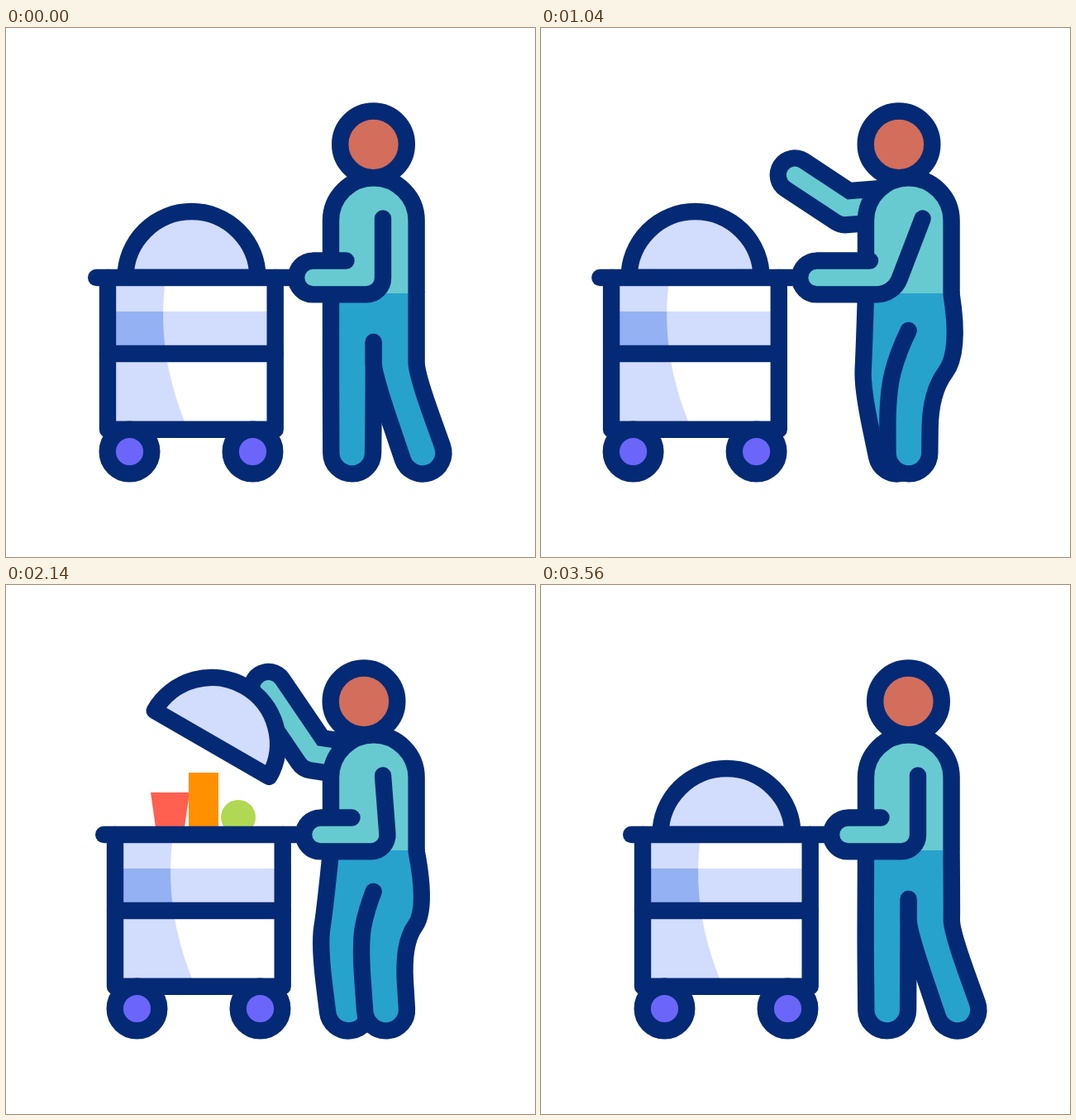
Recreate the animation shown at these times as an HTML page with a canvas. Size 640 px wide and 640 px high, loop 3.6 s.

```html
<!DOCTYPE html>
<html lang="en">
<head>
<meta charset="utf-8">
<title>Serving trolley</title>
<style>
html, body { margin: 0; width: 100%; height: 100%; overflow: hidden; background: #fff; }
canvas { display: block; width: 640px; height: 640px; }
</style>
</head>
<body>
<canvas id="stage" width="640" height="640"></canvas>
<script>
const LOOP = 3600;
const NAVY = '#042a75', TEAL = '#67cad0', BLUE = '#27a2cd', SKIN = '#d36d5c';
const LILAC = '#d2dcfd', SHADE = '#94b1f3', WHEEL = '#6b65fa';
const HIP_Y = 322, CROTCH_X = 444.7, FAR_HIP = 393, NEAR_HIP = 496.6;
const LEG_WIDTH = NEAR_HIP - CROTCH_X;
const FAR_FOOT = 418.7, NEAR_FOOT = 504;
const ctx = document.getElementById('stage').getContext('2d');

const mix = (a, b, k) => a + (b - a) * k;

function ease(from, to, t) {
  const p = Math.min(1, Math.max(0, (t - from) / (to - from)));
  return p * p * (3 - 2 * p);
}

// A pose that eases through successive moves [from, to, ...values] and rests between them.
const motion = (pose, ...moves) => t => moves.reduce(
  (now, [from, to, ...next]) => now.map((v, i) => mix(v, next[i], ease(from, to, t))), pose);

const cartShift = motion([0], [0, 600, -40], [950, 1680, 9], [2400, 3300, 0]);
const headX = motion([444.5], [0, 760, 433], [2400, LOOP, 444.5]);
const lidLift = motion([0], [1440, 2100, 1], [2160, 2640, 0]);
const feet = motion([FAR_FOOT, NEAR_FOOT],
  [0, 600, 451, 427], [750, 1680, 365, NEAR_FOOT],
  [1680, 2400, 435, 441], [2760, 3300, FAR_FOOT, NEAR_FOOT]);
const freeHand = motion([425, 262], [0, 600, 338, 165], [1500, 2400, 425, 262]);
const hold = motion([0], [850, 1440, 1], [2640, 3500, 0]);
const elbow = motion([428, 264],
  [0, 600, 371, 209], [850, 1440, 358, 245], [1440, 2100, 371, 204],
  [2160, 2640, 358, 252], [2640, 3500, 428, 264]);
const shoulderY = motion([213], [2160, 2640, 230], [3400, LOOP, 213]);

function stroke(color = NAVY, width = 20.4) {
  ctx.strokeStyle = color;
  ctx.lineWidth = width;
  ctx.stroke();
}

function fill(color) {
  ctx.fillStyle = color;
  ctx.fill();
}

function line(...points) {
  ctx.beginPath();
  for (let i = 0; i < points.length; i += 2) ctx.lineTo(points[i], points[i + 1]);
}

function circle(x, y, r) {
  ctx.beginPath();
  ctx.arc(x, y, r, 0, 2 * Math.PI);
}

function rect(color, x, y, w, h) {
  ctx.fillStyle = color;
  ctx.fillRect(x, y, w, h);
}

function shifted(dx, paint) {
  ctx.save();
  ctx.translate(dx, 0);
  paint();
  ctx.restore();
}

function drawFarArm(t, lid, lift) {
  const [freeX, freeY] = freeHand(t), [grip] = hold(t);
  const c = Math.cos(lid.angle), s = Math.sin(lid.angle), reach = 85 + 7 * lift;
  const handX = mix(freeX, lid.x + 26 * c + reach * s, grip);
  const handY = mix(freeY, lid.y + 26 * s - reach * c, grip);
  line(handX, handY, ...elbow(t), 430, ...shoulderY(t));
  stroke(NAVY, 61);
  stroke(TEAL, 20.5);
}

function drawFood() {
  line(166, 251, 213, 251, 206, 300, 173, 300);
  fill('#ff6050');
  rect('#ff9000', 212, 227, 36, 73);
  circle(272, 281, 21);
  fill('#b0d852');
}

function drawLid({ x, y, angle }) {
  ctx.beginPath();
  ctx.arc(x, y, 80, angle + Math.PI, angle);
  ctx.closePath();
  fill(LILAC);
  stroke();
}

function drawCart() {
  rect('#fff', 123, 302, 203, 184);
  rect(LILAC, 123, 343, 203, 45);
  ctx.save();
  line(123, 476, 123, 312, 192, 312);
  ctx.bezierCurveTo(188, 350, 188, 405, 216, 476);
  ctx.clip();
  rect(LILAC, 123, 302, 110, 184);
  rect(SHADE, 123, 343, 110, 45);
  ctx.restore();

  for (const x of [149.5, 298.5]) {
    circle(x, 512.5, 26.8);
    fill(WHEEL);
    stroke();
  }
  line(123, 302, 123, 485.7, 325.7, 485.7, 325.7, 302);
  stroke();
  line(123, 394, 325.7, 394);
  stroke();
  line(109.2, 302, 348, 302);
  stroke();
}

// side is 1 when the outer edge of the leg is on the right, -1 when it is on the left.
function drawLeg({ side, hipX, outerKnee, outerShin, shinY, footX, forkY }) {
  const r = 25.4, footY = 514, kneeY = 392, midY = (kneeY + shinY) / 2;
  const innerShin = outerShin - side * LEG_WIDTH;
  const innerKnee = (CROTCH_X + innerShin) / 2;
  const lean = Math.atan2(footX - (outerShin + innerShin) / 2, footY - shinY);
  const dx = side * r * Math.cos(lean), dy = -side * r * Math.sin(lean);
  const heel = Math.atan2(dy, dx);
  const calf = (shinX, sign) => [
    mix(shinX, footX + sign * dx, 0.6), mix(shinY, footY + sign * dy, 0.6)];

  const edge = () => {
    ctx.beginPath();
    ctx.moveTo(hipX, HIP_Y);
    ctx.quadraticCurveTo(outerKnee, kneeY, (outerKnee + outerShin) / 2, midY);
    ctx.quadraticCurveTo(outerShin, shinY, ...calf(outerShin, 1));
    ctx.arc(footX, footY, r, heel, heel + side * Math.PI, side < 0);
    ctx.lineTo(...calf(innerShin, -1));
    ctx.quadraticCurveTo(innerShin, shinY, (innerKnee + innerShin) / 2, midY);
    ctx.quadraticCurveTo(innerKnee, kneeY, CROTCH_X, forkY);
  };
  edge();
  ctx.lineTo(CROTCH_X - side * 3, HIP_Y - 2);
  ctx.lineTo(hipX, HIP_Y - 2);
  fill(BLUE);
  edge();
  stroke();
}

function drawLegs(t) {
  const [farX, nearX] = feet(t);
  const sway = 14 * Math.sin(Math.PI * t / LOOP);
  // The further the near foot comes forward, the more its knee bends.
  const bend = 0.056 * Math.max(0, NEAR_FOOT - nearX) ** 1.5;
  const forkY = 380 - 0.55 * bend;
  const farShin = FAR_HIP + 0.45 * (farX - FAR_FOOT) - 0.9 * sway;
  drawLeg({
    side: -1, hipX: FAR_HIP, outerKnee: (FAR_HIP + farShin) / 2,
    outerShin: farShin, shinY: 435, footX: farX, forkY
  });
  drawLeg({
    side: 1, hipX: NEAR_HIP, outerKnee: NEAR_HIP + sway,
    outerShin: NEAR_HIP - bend, shinY: 418 + 0.9 * bend, footX: nearX, forkY
  });
}

function drawTorso() {
  ctx.beginPath();
  ctx.moveTo(FAR_HIP, 321);
  ctx.arc(444.8, 233, 51.8, Math.PI, 0);
  ctx.lineTo(NEAR_HIP, 321);
  ctx.lineCap = 'butt';
  fill(TEAL);
  stroke();
  ctx.lineCap = 'round';
}

function drawNearArm(shift) {
  const reach = Math.max(0, -shift) / 40;
  const elbowX = 456 + 0.78 * shift, handX = 371.5 + shift, shoulderX = 456 + 6 * reach;
  ctx.beginPath();
  ctx.moveTo(411.5 + 0.78 * shift + 17 * reach, 281.5);
  ctx.lineTo(handX, 281.5);
  ctx.arc(handX, 302, 20.4, -Math.PI / 2, Math.PI / 2, true);
  ctx.arcTo(elbowX, 322.4, shoulderX, 230.5, 20 + 10 * reach);
  ctx.lineTo(shoulderX, 230.5);
  fill(TEAL);
  stroke();
}

function draw(t) {
  const [shift] = cartShift(t), [lift] = lidLift(t);
  const lid = {
    x: 224.5 + shift + 15.5 * lift,
    y: 302 - 110 * lift,
    angle: lift * Math.PI / 6
  };
  rect('#fff', 0, 0, 640, 640);
  ctx.lineCap = ctx.lineJoin = 'round';

  drawFarArm(t, lid, lift);
  shifted(shift, drawFood);
  drawLid(lid);
  shifted(shift, drawCart);
  drawLegs(t);
  drawTorso();
  drawNearArm(shift);

  circle(headX(t)[0], 140.8, 40.3);
  fill(SKIN);
  stroke();
}

const start = performance.now();
function frame() {
  draw((performance.now() - start) % LOOP);
  requestAnimationFrame(frame);
}
frame();
</script>
</body>
</html>
```
